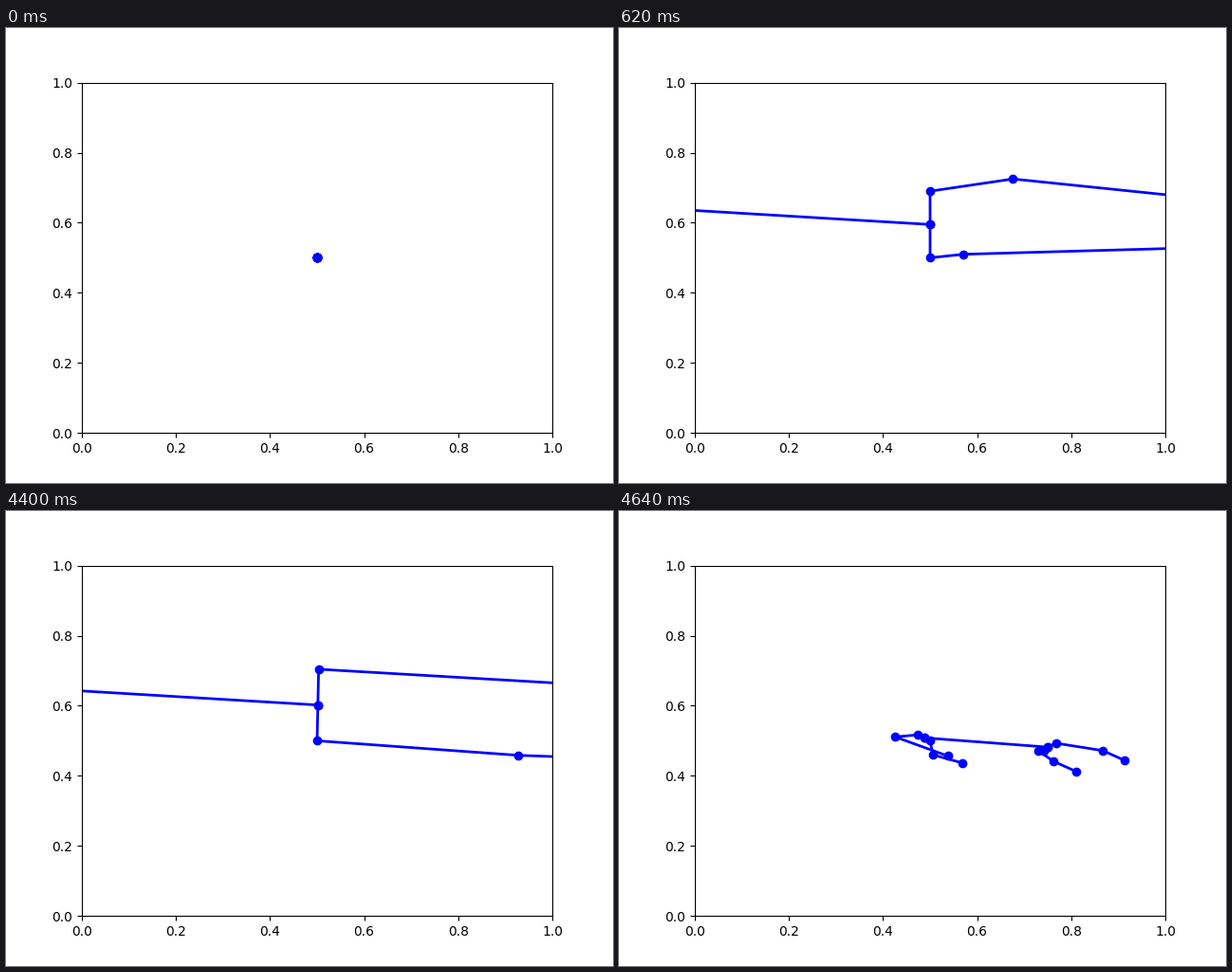
These frames come from a looping animation (640x480 px, 8000 ms). A matplotlib script:

```python
import numpy as np
import matplotlib.pyplot as plt
from matplotlib.animation import FuncAnimation

TICK = 10                # ms per frame
LOOP = 8000
STEP, LAST = 30, 8       # ms per pose change, final step of a burst
ROOT = 0.5 + 0.5j
FAR = -1 + 0.08j         # spine direction while the hips are out of view
ARM_TAPER, LEG_TAPER = 0.4, 1

# Bones are complex vectors. Each half of the body is a mirrored pair:
# half width at the body, half width at the middle joint, upper bone, lower bone.
# The rear half ends with the tail.
arms_small = np.array([.0145j, .009+.0225j, -.138+.023j, -.0095+.001j])
arms_wide = np.array([.095j, .0525+.1075j, .1235+.0225j, .75-.035j])
arms_full = np.array([.002+.1245j, .085+.123j, .563-.0485j, .6-.1j])
arms_back = arms_full * [.82, .82, .88, .88]
arms_turn = np.array([-.003+.0395j, .0215+.042j, .2655-.0355j, 1-.124j])
arms_fold = np.array([-.013+.0085j, -.04+.0255j, -.021-.023j, .0875-.039j])

legs_small = np.array([.01+.0145j, .002+.009j, -.06+.0215j, .0645-.024j,
                       -.082+.0325j])
legs_turn = np.array([.006+.0415j, .0055+.0375j, .113+.073j, -.046-.0125j,
                      -.102+.0315j])
legs_fold = np.array([.019+.011j, .052+.0155j, .066-.0255j, .0465-.028j,
                      -.007-.01j])


def pose(arms, spine, legs):
    return np.concatenate([arms, [spine], legs])


rise = [pose(arms_small, -.258+.028j, legs_small),
        pose(arms_wide, FAR, 2 * legs_small),
        pose(arms_full, 1.2 * FAR, 2 * legs_small)]
turn = [pose(arms_back, .9 * FAR, 1.7 * legs_turn),
        pose(arms_turn, -.37+.019j, legs_turn),
        pose(arms_fold, .262-.0265j, legs_fold)]

# start time, step of the middle pose, poses
BURSTS = [(500, 4, rise), (4400, 3, turn)]


def pose_at(ms):
    bones = np.zeros(10, complex)
    for start, mid, (a, b, c) in BURSTS:
        if ms >= start:
            s = min((ms - start) // STEP, LAST)
            # quadratic path through the three poses
            bones = (a * (s - mid) * (s - LAST) / (mid * LAST)
                     + b * s * (s - LAST) / (mid * (mid - LAST))
                     + c * s * (s - mid) / (LAST * (LAST - mid)))
    return bones


def limbs(centre, width, spread, upper, lower, taper):
    """Points from one tip over the body to the other tip."""
    joint = centre + upper
    tip = joint + lower
    ends = [tip, joint, centre]
    halves = [taper * spread, spread, width]
    near = [p - h for p, h in zip(ends, halves)]
    far = [p + h for p, h in zip(ends, halves)]
    return near + [centre] + far[::-1]


fig, ax = plt.subplots(figsize=(6.4, 4.8), dpi=100)
ax.set_xlim(0, 1)
ax.set_ylim(0, 1)
lines = [ax.plot([], [], 'bo-', lw=2)[0] for _ in range(3)]


def update(i):
    bones = pose_at(i * TICK)
    arms, spine, legs, tail = bones[:4], bones[4], bones[5:9], bones[9]
    neck = ROOT + arms[0]
    hip = neck + spine
    chains = [limbs(neck, *arms, ARM_TAPER),
              [neck, hip, hip + tail],
              limbs(hip, *legs, LEG_TAPER)]
    for line, pts in zip(lines, chains):
        line.set_data(np.real(pts), np.imag(pts))
    return lines


anim = FuncAnimation(fig, update, frames=LOOP // TICK, interval=TICK,
                     repeat=True, repeat_delay=0)
plt.show()
```
